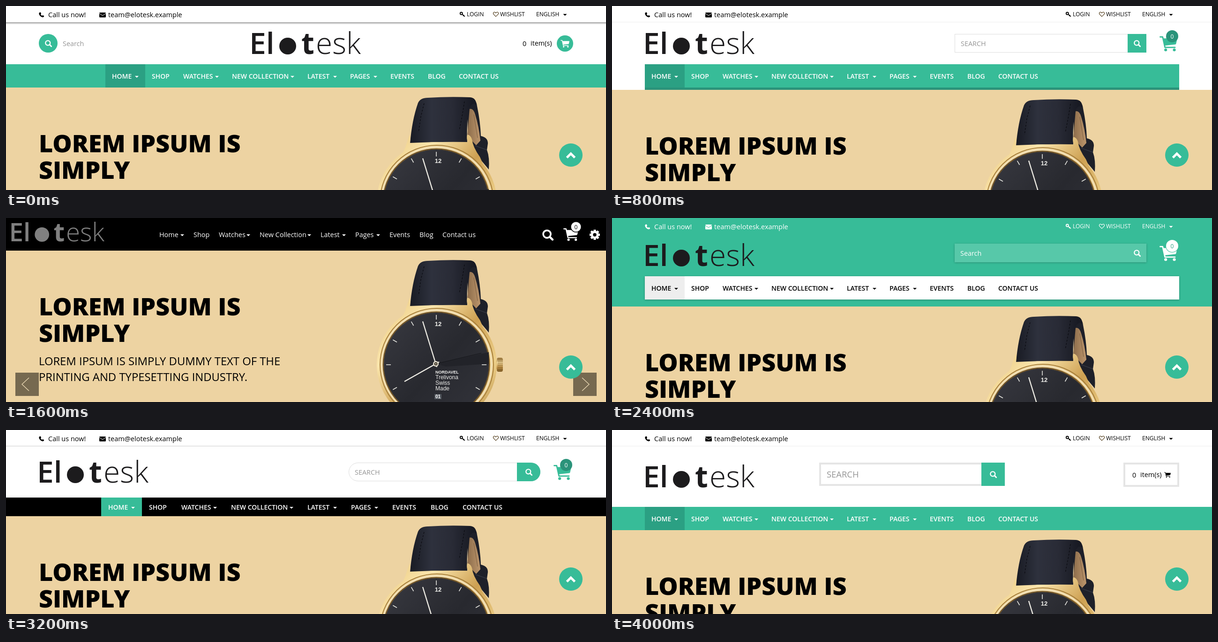
An HTML page with a canvas for the animation above (4800 ms loop, 1280 by 395 pixels).

```html
<!DOCTYPE html>
<html lang="en">
<head>
<meta charset="utf-8">
<title>Shop headers</title>
<style>
html, body { margin: 0; width: 100%; height: 100%; overflow: hidden; background: #fff; }
canvas { display: block; width: 1280px; height: 395px; }
</style>
</head>
<body>
<canvas id="stage" width="1280" height="395"></canvas>
<script>
const c = document.getElementById('stage').getContext('2d');
const GREEN = '#37bc98', DARK = '#2ba083', BADGE = '#2b937a', GREY = '#959595', INK = '#1c1b1d';
const BODY = 14.4, SANS = '"Open Sans", sans-serif', ARIAL = '"Liberation Sans", sans-serif';
const HOLD = 800;

function rect(x, y, w, h, fill) {
  c.fillStyle = fill;
  c.fillRect(x, y, w, h);
}
function disc(x, y, r, fill) {
  c.beginPath();
  c.arc(x, y, r, 0, Math.PI * 2);
  c.fillStyle = fill;
  c.fill();
}
function ring(x, y, r, width, color) {
  c.beginPath();
  c.arc(x, y, r, 0, Math.PI * 2);
  c.lineWidth = width;
  c.strokeStyle = color;
  c.stroke();
}
function line(points, width, color, cap = 'butt') {
  c.beginPath();
  points.forEach(p => c.lineTo(p[0], p[1]));
  c.lineWidth = width;
  c.lineCap = cap;
  c.strokeStyle = color;
  c.stroke();
}
function shape(d, fill) {
  c.fillStyle = fill;
  c.fill(new Path2D(d));
}
function text(s, x, y, color, size = BODY, weight = 400, family = SANS, align = 'left') {
  c.font = `${weight} ${size}px ${family}`;
  c.textAlign = align;
  c.fillStyle = color;
  c.fillText(s, x, y);
}
function at(x, y, scale, draw) {
  c.save();
  c.translate(x, y);
  c.scale(scale, scale);
  draw();
  c.restore();
}
function shaded(color, blur, dy, draw) {
  c.save();
  c.shadowColor = color;
  c.shadowBlur = blur;
  c.shadowOffsetY = dy;
  draw();
  c.restore();
}
function blend(x0, y0, x1, y1, ...colors) {
  const g = c.createLinearGradient(x0, y0, x1, y1);
  colors.forEach((k, i) => g.addColorStop(i / (colors.length - 1), k));
  return g;
}

// Icons
function lens(x, y, size, color) {
  at(x, y, size / 15, () => {
    ring(-1.2, -1.2, 5, 2.3, color);
    line([[2.6, 2.6], [6.2, 6.2]], 2.8, color, 'round');
  });
}
function cart(x, y, width, color) {
  at(x, y, width / 26, () => {
    c.lineJoin = 'round';
    line([[1, 1], [4.6, 1], [8, 16.4], [22.6, 16.4]], 1.9, color, 'round');
    shape('M5.5 3 H25 Q26 3 25.8 4 L24.2 11 Q24 11.8 23.2 11.9 L7.6 13.6Z', color);
    disc(9, 20, 2.1, color);
    disc(21.6, 20, 2.1, color);
  });
}
function gear(x, y, color, hole) {
  at(x, y, 1, () => {
    for (let i = 0; i < 8; i++) {
      rect(-2.5, -11, 5, 6, color);
      c.rotate(Math.PI / 4);
    }
  });
  disc(x, y, 8.4, color);
  disc(x, y, 3.7, hole);
}
function badge(x, y, r, fill, color) {
  disc(x, y, r, fill);
  text('0', x, y + 4.5, color, 12, 400, SANS, 'center');
}
function caret(x, y, color) {
  shape(`M${x} ${y}h8l-4 4z`, color);
}

// Header parts
function logo(x, y, scale, color) {
  at(x, y, scale, () => {
    text('El', -4, 48, color, 64, 600);
    disc(78, 31, 18, color);
    text('t', 107, 48, color, 64, 700);
    text('esk', 138, 48, color, 64, 300);
  });
}
function topBar(color, back, heart) {
  at(70, 13, 1, () => {
    shape('M2.4 0.6 Q3.6 0 4.2 1.2 L5 3.2 Q5.2 4 3.8 4.9 Q4.8 7 7 8.1 Q7.9 6.7 8.7 7 L10.7 8 Q11.6 8.5 11 9.6 Q10 11.7 7.6 11.2 Q1.4 9.4 0.3 3.6 Q0.1 1.4 2.4 0.6Z', color);
  });
  text('Call us now!', 90, 24, color, 14.5);
  c.beginPath();
  c.roundRect(199, 14, 14, 10.5, 1.5);
  c.fillStyle = color;
  c.fill();
  line([[199, 16], [206, 20.6], [213, 16]], 1, back);
  text('team@elotesk.example', 218, 24, color, 14.5);

  ring(971.3, 16, 2.5, 1.8, color);
  line([[973, 17.6], [978.8, 22.6]], 1.9, color);
  line([[975.2, 21.6], [977, 19.4]], 1.7, color);
  text('LOGIN', 983, 22, color, 12);
  c.lineWidth = 1.1;
  c.strokeStyle = heart;
  c.stroke(new Path2D('M1045 22.6 L1040.3 18 C1038 15 1041 12 1043.4 13.5 L1045 15 L1046.6 13.5 C1049 12 1052 15 1049.7 18Z'));
  text('WISHLIST', 1054, 22, color, 12);
  text('ENGLISH', 1131, 22, color, 12);
  caret(1188.5, 17, color);
}
const LINKS = ['Home', 'Shop', 'Watches', 'New Collection', 'Latest', 'Pages', 'Events', 'Blog', 'Contact us'];
const WIDE = [0, 85, 152, 256, 417, 508, 594, 674, 740];
const SPACED = [0, 87, 156, 262, 425, 518, 606, 688, 756];
const MIXED = [0, 73, 127, 214, 344, 418, 491, 555, 604];
const CARETS = { 0: 49, 2: 68, 3: 125, 4: 55, 5: 50 };
const MIXED_CARETS = { 0: 45, 2: 59, 3: 102, 4: 46, 5: 45 };

function nav(x, y, offsets, color, mixed) {
  const marks = mixed ? MIXED_CARETS : CARETS;
  LINKS.forEach((s, i) => {
    if (mixed) text(s, x + offsets[i], y, color);
    else text(s.toUpperCase(), x + offsets[i], y, color, 14, 600);
    if (i in marks) caret(x + offsets[i] + marks[i], y - 6, color);
  });
}
function whiteTop(edge) {
  rect(0, 0, 1280, 220, '#fff');
  rect(0, 34, 1280, 1, edge);
  topBar('#000', '#fff', '#4f3a18');
}
function frame(x, y, w, h, width, color) {
  c.lineWidth = width;
  c.strokeStyle = color;
  c.strokeRect(x + width / 2, y + width / 2, w - width, h - width);
}
function bigCart(y, color, fill, label) {
  cart(1168, y, 38, color);
  badge(1195, y, 13, fill, label);
}

// Banner
function watch() {
  shape('M985 24 Q1004 24 1005 40 Q1012 74 1013 104 Q1028 107 1028 120 L1026 134 Q1032 150 1030 176 L985 122Z', '#1e2029');
  shape('M989 46 Q997 44 1001 58 Q1009 84 1012 114 L1003 124 L984 104Z', blend(986, 0, 1012, 0, '#8f6f4d', '#bd966c'));
  line([[998, 58], [1006, 108]], 1, '#7d6043');
  line([[1001, 125], [1026, 134]], 1.5, '#343640');
  shape('M862 120 Q866 70 879 33 Q884 22 900 22 Q945 19 990 21 Q1003 22 1004 38 Q994 30 989 45 Q982 72 984 118 Q922 122 862 120Z',
    blend(864, 0, 995, 0, '#1a1c25', '#2e313d', '#292b36', '#181a23'));
  c.setLineDash([4, 3]);
  line([[892, 34], [885, 62], [880, 96]], 1.2, '#0b0c11');
  line([[978, 30], [974, 56], [967, 92]], 1.2, '#0b0c11');
  c.setLineDash([]);

  const gold = blend(790, 120, 1050, 360, '#e9c67c', '#fbe6ad', '#cda052', '#efd18a', '#b0833a');
  rect(1043, 236, 6, 18, '#a37a3c');
  c.beginPath();
  c.roundRect(1047, 230, 13, 30, 4);
  c.fillStyle = blend(0, 230, 0, 260, '#8d672c', '#f4dda2', '#c3954b', '#795721');
  c.fill();
  for (let y = 235; y < 258; y += 4) line([[1049, y], [1060, y]], 1, '#795721');
  shape('M861 101 Q864 108 861 119 Q923 116 985 117 Q982 108 984 101 Q991 102 994 111 Q996 128 1011 149 L1022 174 L820 174 Q848 146 854 122Z', gold);
  disc(919, 245, 128, gold);
  ring(919, 245, 121, 2, '#a8803d');
  ring(919, 245, 117, 4, '#f2dfb3');
  ring(918, 245, 113, 3, '#725528');
  disc(918, 245, 112, blend(830, 170, 1010, 330, '#34353c', '#28292f', '#313239'));
  shape('M918 243 L1030 218 L1030 243 L938 249Z', '#222329');

  at(918, 245, 1, () => {
    for (let i = 0; i < 12; i++) {
      line([[0, -107], [0, -97]], 1.6, '#e5e5df');
      c.rotate(Math.PI / 6);
    }
  });
  text('12', 922, 162, '#f2f2ed', 13, 700, ARIAL, 'center');
  text('6', 919, 335, '#f2f2ed', 13, 700, ARIAL, 'center');
  text('NORDAVEL', 916, 264, '#f1f1ef', 9, 700, ARIAL);
  ['Trelivona', 'Swiss', 'Made'].forEach((s, i) => text(s, 916, 276 + i * 12, '#eeeeec', 12, 400, ARIAL));
  rect(914, 308, 15, 11, '#51565d');
  text('01', 921.5, 317, '#fff', 10, 700, ARIAL, 'center');

  line([[917, 243], [1014, 220]], 1.2, '#15161a');
  line([[919, 250], [889, 152]], 2.3, '#f0eee6');
  line([[924, 239], [850, 281]], 2.3, '#f0eee6');
  disc(917, 243, 6, '#e6dfce');
  disc(917, 243, 3.5, '#34312c');
  disc(917, 243, 1.5, '#d5c49c');
}
function arrowBox(x, tip, dir) {
  rect(x, 262, 50, 50, 'rgba(0,0,0,.5)');
  line([[tip + 15 * dir, 273], [tip, 287], [tip + 15 * dir, 301]], 1.3, '#ecdab5');
}
function banner(top) {
  at(0, top, 1, () => {
    rect(0, 0, 1280, 395, '#edd3a2');
    watch();
    text('LOREM IPSUM IS', 70, 139, '#000', 52, 800);
    text('SIMPLY', 70, 196, '#000', 52, 800);
    text('LOREM IPSUM IS SIMPLY DUMMY TEXT OF THE', 70, 246, '#000', 23.8);
    text('PRINTING AND TYPESETTING INDUSTRY.', 70, 280, '#000', 23.8);
    arrowBox(20, 34, 1);
    arrowBox(1210, 1244, -1);
  });
  disc(1205, 320, 25, GREEN);
  c.lineJoin = 'miter';
  line([[1196.5, 325.5], [1205, 317], [1213.5, 325.5]], 5, '#fff');
}

const scenes = [
  function centred() {
    banner(175);
    rect(0, 0, 1280, 125, '#fff');
    shaded('rgba(0,0,0,.65)', 4, 1, () => rect(-10, 0, 1300, 35, '#fff'));
    topBar('#000', '#fff', '#4f3a18');
    disc(90, 80, 20, GREEN);
    lens(90.5, 80.5, 15, '#fff');
    text('Search', 121, 86, GREY);
    logo(523, 55, 1, INK);
    text('0', 1102, 86, '#000', BODY, 500);
    text('item(s)', 1119, 85, '#000', BODY, 500);
    disc(1192.5, 80.5, 17.5, GREEN);
    cart(1183, 73, 19, '#fff');
    rect(0, 125, 1280, 50, GREEN);
    rect(212, 125, 85, 50, DARK);
    nav(226, 156, WIDE, '#fff');
  },
  function boxed() {
    whiteTop('#eee');
    banner(180);
    logo(70, 55, 1, INK);
    frame(731, 60, 409, 40, 1, '#ddd');
    text('SEARCH', 744, 86, GREY);
    rect(1100, 60, 40, 40, GREEN);
    lens(1120.5, 80.5, 15, '#fff');
    bigCart(65, GREEN, BADGE, '#fff');
    rect(70, 125, 1140, 50, GREEN);
    rect(70, 175, 1140, 5, BADGE);
    rect(70, 125, 85, 50, DARK);
    nav(84, 156, WIDE, '#fff');
  },
  function slim() {
    banner(70);
    rect(0, 0, 1280, 70, '#000');
    logo(10, 9, .855, '#808080');
    nav(327, 41, MIXED, '#fff', true);
    lens(1156, 36.5, 24, '#fff');
    cart(1189, 22, 32, '#fff');
    disc(1216, 19, 12, '#000');
    badge(1216, 19, 10.5, '#fff', '#000');
    gear(1256, 36, '#fff', '#000');
  },
  function tinted() {
    banner(190);
    rect(0, 0, 1280, 190, GREEN);
    topBar('#fff', GREEN, '#fff');
    logo(70, 55, 1, INK);
    shaded('rgba(0,0,0,.25)', 4, 1, () => rect(731, 55, 409, 40, '#57c8a9'));
    text('Search', 743, 81, '#fff');
    lens(1120.5, 75.5, 15, '#fff');
    cart(1168, 60, 38, '#fff');
    disc(1195, 60, 14, GREEN);
    badge(1195, 60, 13, '#fff', DARK);
    shaded('rgba(0,0,0,.3)', 4, 1, () => rect(70, 125, 1140, 50, '#fff'));
    rect(70, 125, 85, 50, '#eee');
    nav(84, 156, WIDE, '#000');
  },
  function rounded() {
    whiteTop('#ccc');
    banner(185);
    logo(70, 65, 1, INK);
    c.beginPath();
    c.roundRect(731.5, 70.5, 408, 39, 20);
    c.lineWidth = 1;
    c.strokeStyle = '#ddd';
    c.stroke();
    text('SEARCH', 744, 96, GREY);
    c.beginPath();
    c.roundRect(1090, 70, 50, 40, [0, 20, 20, 0]);
    c.fillStyle = GREEN;
    c.fill();
    lens(1115.5, 90.5, 15, '#fff');
    bigCart(75, GREEN, BADGE, '#fff');
    rect(0, 145, 1280, 40, '#000');
    rect(203, 145, 87, 40, GREEN);
    nav(218, 171, SPACED, '#fff');
  },
  function framed() {
    whiteTop('#eee');
    banner(215);
    logo(70, 75, 1, INK);
    frame(442, 70, 396, 50, 4, '#e5e5e5');
    text('SEARCH', 458, 102, GREY, 18.4);
    rect(788, 70, 50, 50, GREEN);
    lens(813.5, 95.5, 15, '#fff');
    frame(1091, 70, 119, 52, 4, '#e5e5e5');
    text('0', 1110, 102, '#000', BODY, 500);
    text('item(s)', 1127, 101, '#000', BODY, 500);
    cart(1178, 90.5, 14, '#000');
    rect(0, 165, 1280, 50, GREEN);
    rect(70, 165, 85, 50, DARK);
    nav(84, 196, WIDE, '#fff');
  }
];

const start = performance.now();
function tick() {
  const t = performance.now() - start;
  scenes[Math.floor(t / HOLD) % scenes.length]();
  requestAnimationFrame(tick);
}
tick();
</script>
</body>
</html>
```
